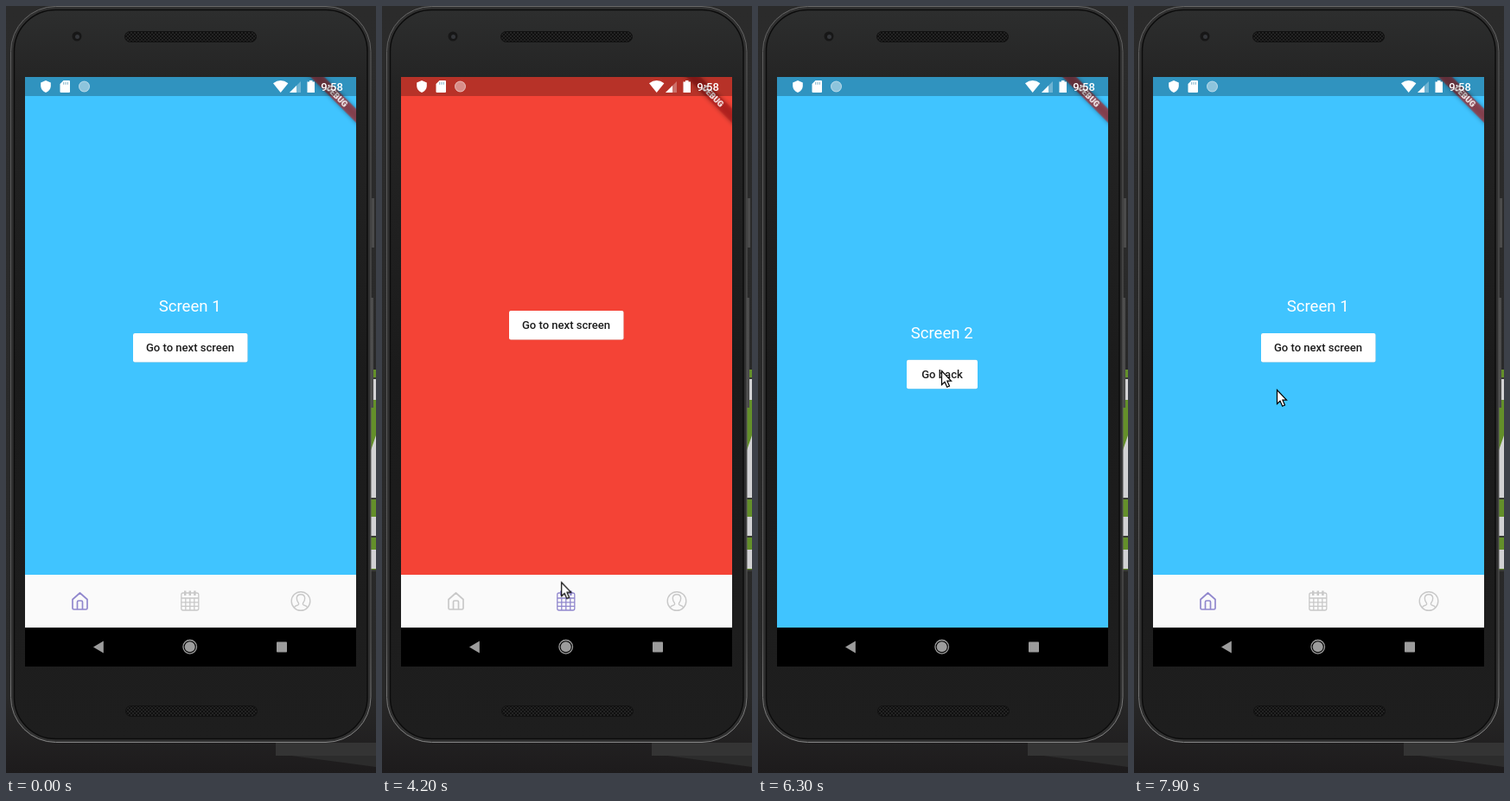
Animation, 428 px wide and 886 px high, one loop 8 s. Source, as an HTML page:

```html
<!DOCTYPE html>
<html lang="en">
<head>
<meta charset="utf-8">
<title>Tab navigation</title>
<style>
html, body { margin: 0; width: 100%; height: 100%; overflow: hidden; background: #272727; }
svg { display: block; width: 428px; height: 886px; }
text { font-family: Roboto, sans-serif; text-anchor: middle; }
.title { font-size: 18.6px; fill: #fff; }
.label { font-size: 13.05px; font-weight: 500; fill: #1d1d1d; }
.btn { fill: #fff; filter: drop-shadow(0 .5px .7px #0004); }

/* 1% = 80 ms */
.nested, .full, .red, .home, .cal, .cursor, .arrow, .ripple { animation: 8s linear infinite; }
.nested { animation-name: nested-fade, nested-slide; }
.full { animation-name: full-fade, full-slide; }
.red { animation-name: red; animation-timing-function: step-end; }
.home { animation-name: home; animation-timing-function: step-end; }
.cal { animation-name: cal; animation-timing-function: step-end; }
.cursor { animation-name: move; }
.arrow { animation-name: show; animation-timing-function: step-end; }
.ripple { animation-name: ripple; animation-delay: calc(var(--tap) - 8s); transform-box: fill-box; transform-origin: center; }

@keyframes ripple {
  0% { transform: scale(.2); opacity: .12; }
  2.5% { transform: none; opacity: .12; }
  5%, 100% { transform: none; opacity: 0; }
}
@keyframes nested-fade {
  0%, 22.4% { opacity: 0; animation-timing-function: cubic-bezier(.42,0,1,1); }
  26.15%, 37.5% { opacity: 1; animation-timing-function: cubic-bezier(0,0,.58,1); }
  41.25%, 100% { opacity: 0; }
}
@keyframes nested-slide {
  0%, 22.4% { transform: translateY(143.5px); animation-timing-function: cubic-bezier(.4,0,.2,1); }
  26.15%, 37.5% { transform: none; animation-timing-function: cubic-bezier(.8,0,.6,1); }
  41.25%, 100% { transform: translateY(143.5px); }
}
@keyframes full-fade {
  0%, 61.9% { opacity: 0; animation-timing-function: cubic-bezier(.42,0,1,1); }
  65.6%, 81% { opacity: 1; animation-timing-function: cubic-bezier(0,0,.58,1); }
  84.75%, 100% { opacity: 0; }
}
@keyframes full-slide {
  0%, 61.75% { transform: translateY(159px); animation-timing-function: cubic-bezier(.4,0,.2,1); }
  65.5%, 81% { transform: none; animation-timing-function: cubic-bezier(.8,0,.6,1); }
  84.75%, 100% { transform: translateY(159px); }
}
@keyframes red { 0%, 92.5%, 100% { opacity: 0; } 48.75% { opacity: 1; } }
@keyframes home { 0%, 92.5%, 100% { color: #9087cd; } 48.75% { color: #c8c8c8; } }
@keyframes cal { 0%, 92.5%, 100% { color: #c8c8c8; } 48.75% { color: #9087cd; } }
@keyframes show { 0%, 7.5% { opacity: 0; } 6.25%, 10%, 100% { opacity: 1; } }
@keyframes move {
  0%, 7.5% { transform: translate(99px,-15px); }
  7.6%, 10% { transform: translate(42px,600px); animation-timing-function: ease-out; }
  16.25%, 40% { transform: translate(193px,395px); }
  43.75% { transform: translate(168px,603px); animation-timing-function: ease-out; }
  47.5%, 51.25% { transform: translate(207px,683px); animation-timing-function: ease-in-out; }
  58.75%, 66.25% { transform: translate(210px,373px); animation-timing-function: ease-in-out; }
  70% { transform: translate(207px,409px); }
  71.25%, 75% { transform: translate(218px,416px); }
  78.75%, 81.25% { transform: translate(212px,421px); }
  85% { transform: translate(211px,428px); animation-timing-function: ease-in-out; }
  91.25%, 93.75% { transform: translate(83px,683px); animation-timing-function: ease-in-out; }
  98.75%, 100% { transform: translate(165px,443px); }
}
</style>
</head>
<body>
<svg viewBox="0 0 428 886">
  <defs>
    <linearGradient id="back" x2="0" y2="1">
      <stop stop-color="#2b2b2b"/><stop offset=".9" stop-color="#282828"/><stop offset="1" stop-color="#1d1b1c"/>
    </linearGradient>
    <linearGradient id="shell" x2="0" y2="1">
      <stop stop-color="#2d2e2e"/><stop offset=".1" stop-color="#242424"/>
      <stop offset=".5" stop-color="#1b1b1b"/><stop offset="1" stop-color="#1e1e1e"/>
    </linearGradient>
    <linearGradient id="rim" x2="0" y2="1">
      <stop stop-color="#686868"/><stop offset=".12" stop-color="#585858"/>
      <stop offset=".85" stop-color="#585858"/><stop offset="1" stop-color="#858585"/>
    </linearGradient>
    <pattern id="mesh" width="4" height="4" patternUnits="userSpaceOnUse">
      <rect width="4" height="4" fill="#232323"/>
      <circle cx="1" cy="1" r="1" fill="#090909"/><circle cx="3" cy="3" r="1" fill="#090909"/>
    </pattern>
    <clipPath id="screen"><rect x="22" y="82" width="383" height="636"/></clipPath>
    <clipPath id="body"><rect x="22" y="82" width="383" height="575"/></clipPath>
    <clipPath id="wide"><rect x="147" y="378" width="132.500" height="33.500" rx="2"/></clipPath>
    <clipPath id="narrow"><rect x="172" y="378" width="82" height="33.500" rx="2"/></clipPath>
    <g id="back-page">
      <text class="title" x="212.700" y="353.300">Screen 2</text>
      <rect class="btn" x="172" y="378" width="82" height="33.500" rx="2"/>
      <text class="label" x="213" y="399.400">Go back</text>
    </g>
    <g id="next">
      <rect class="btn" x="147" y="378" width="132.500" height="33.500" rx="2"/>
      <text class="label" x="213" y="399.400">Go to next screen</text>
    </g>
  </defs>

  <!-- desktop -->
  <rect width="428" height="886" fill="url(#back)"/>
  <path d="M312 851H428V866H312Z" fill="#343434"/>
  <path d="M330 866H428V879Z" fill="#2c2c2c"/>
  <path d="M421 420h7v232h-7z" fill="#64902a"/>
  <path d="M421 430h7v25h-7zM428 496v73h-7v-53zM421 590h7v22h-7zM421 628h7v22h-7z" fill="#d2d2d4"/>
  <path d="M421 430h7M421 569h7M421 613h7M421 652h7" stroke="#393d33" stroke-width="2"/>

  <!-- phone -->
  <path d="M423 222h3v57h-3zM422 337h3v127h-3z" fill="#4b4b4b"/>
  <rect x="5.500" y=".5" width="416.500" height="850" rx="52" fill="#303030" stroke="url(#rim)"/>
  <rect x="9.500" y="4.500" width="408.500" height="842" rx="48" fill="url(#shell)" stroke="#0c0c0c" stroke-width="1.500"/>
  <circle cx="82" cy="35" r="5.500" fill="#171717"/><circle cx="82.500" cy="35.500" r="2.500" fill="#34363a"/>
  <g fill="url(#mesh)" stroke="#111">
    <rect x="137.500" y="29.500" width="152" height="12" rx="6"/>
    <rect x="138.500" y="808.500" width="152" height="12" rx="6"/>
  </g>

  <g clip-path="url(#screen)">
    <!-- tab content -->
    <g clip-path="url(#body)">
      <path d="M22 82h383v575H22z" fill="#40c4ff"/>
      <text class="title" x="212.700" y="353.300">Screen 1</text>
      <use href="#next"/>
      <g clip-path="url(#wide)"><circle class="ripple" style="--tap:1.78s" cx="197" cy="395" r="60"/></g>
      <g class="nested">
        <path d="M22 82h383v575H22z" fill="#40c4ff"/>
        <use href="#back-page"/>
        <g clip-path="url(#narrow)"><circle class="ripple" style="--tap:2.95s" cx="197" cy="395" r="50"/></g>
      </g>
      <g class="red">
        <path d="M22 82h383v575H22z" fill="#f44336"/>
        <g transform="translate(0 -26)">
          <use href="#next"/>
          <g clip-path="url(#wide)"><circle class="ripple" style="--tap:4.8s" cx="211" cy="398" r="52"/></g>
        </g>
      </g>
    </g>

    <!-- tab bar -->
    <path d="M22 657h383v61H22z" fill="#fafafa"/>
    <g fill="none" stroke="currentColor" stroke-width="1.700" stroke-linejoin="round">
      <path class="home" d="M77 685.500L85.500 678 94 685.500V695.500Q94 697 92.500 697H78.500Q77 697 77 695.500ZM82.500 697V688.500Q82.500 687 84 687H87Q88.500 687 88.500 688.500V697"/>
      <g class="cal" stroke-width="1.300">
        <rect x="202.800" y="678" width="20" height="20" rx="2"/>
        <path d="M203 684h20M203 688.800h20M203 693.400h20M207.800 684v14M212.800 684v14M217.800 684v14"/>
        <path d="M207.200 675.500v5.500M212.800 675.500v5.500M218.400 675.500v5.500" stroke-width="2.400"/>
      </g>
      <g color="#c8c8c8" stroke-width="1.400">
        <circle cx="341" cy="687.500" r="10.800"/>
        <path d="M333.300 695Q334 693 337 692.300Q339.300 691.500 338.300 689.500Q336.300 687 336.300 684Q336.500 679.800 341 679.800T345.700 684Q345.700 687 343.700 689.500Q342.700 691.500 345 692.300Q348 693 348.700 695"/>
      </g>
    </g>

    <g class="full">
      <path d="M22 82h383v636H22z" fill="#40c4ff"/>
      <g transform="translate(0 30.700)">
        <use href="#back-page"/>
        <g clip-path="url(#narrow)"><circle class="ripple" style="--tap:6.42s" cx="212" cy="391" r="50"/></g>
      </g>
    </g>

    <!-- debug banner -->
    <g transform="translate(405 82) rotate(45) scale(.932)">
      <rect x="-50" y="28" width="100" height="12" fill="#b71c1c" fill-opacity=".63" style="filter:drop-shadow(0 0 3px #0009)"/>
      <text y="37.600" font-size="10.200" font-weight="900" fill="#fff">DEBUG</text>
    </g>

    <!-- status bar -->
    <path d="M22 82h383v22H22z" fill-opacity=".25"/>
    <g fill="#fff">
      <path d="M46 86l5.800 2.500v4.300q-.4 5-5.800 7.200q-5.400-2.200-5.800-7.200v-4.300z"/>
      <path d="M66.500 86h6.500q1 0 1 1v12q0 1-1 1h-9.500q-1 0-1-1v-9z"/>
      <path d="M66.700 88v2.800M69 88v2.800M71.300 88v2.800" stroke="#2e7fa3" stroke-opacity=".6"/>
      <circle cx="90.500" cy="93" r="6.300" fill-opacity=".45"/>
      <circle cx="90.500" cy="93" r="6" fill="none" stroke="#fff" stroke-opacity=".4"/>
      <path d="M309 89.300q8.700-6.500 17.400 0l-8.700 10.700z"/>
      <path d="M328 100h13v-13z" fill-opacity=".3"/><path d="M328 100h8v-8z"/>
      <path d="M351 86h3.500v1.500h2.500v12.500h-8.500v-12.500h2.500z"/>
      <text x="377" y="97.800" font-size="13.050" font-weight="500">9:58</text>
    </g>
  </g>

  <!-- system keys -->
  <path d="M22 718h383v45H22z"/>
  <g fill="#9c9c9c">
    <path d="M101 740.500l11.800-7v14z"/>
    <circle cx="212.700" cy="740.300" r="6"/>
    <circle cx="212.700" cy="740.300" r="7.800" fill="none" stroke="#9c9c9c" stroke-width="1.300"/>
    <rect x="313" y="734.500" width="12" height="12" rx=".8"/>
  </g>

  <g class="cursor">
    <path class="arrow" d="M.5 .5V16.500L4 13.200 6.700 19.300 9.500 18 6.900 12.200H11.500Z" fill="#fff" stroke="#000" stroke-width="1.200"/>
  </g>
</svg>
</body>
</html>
```
